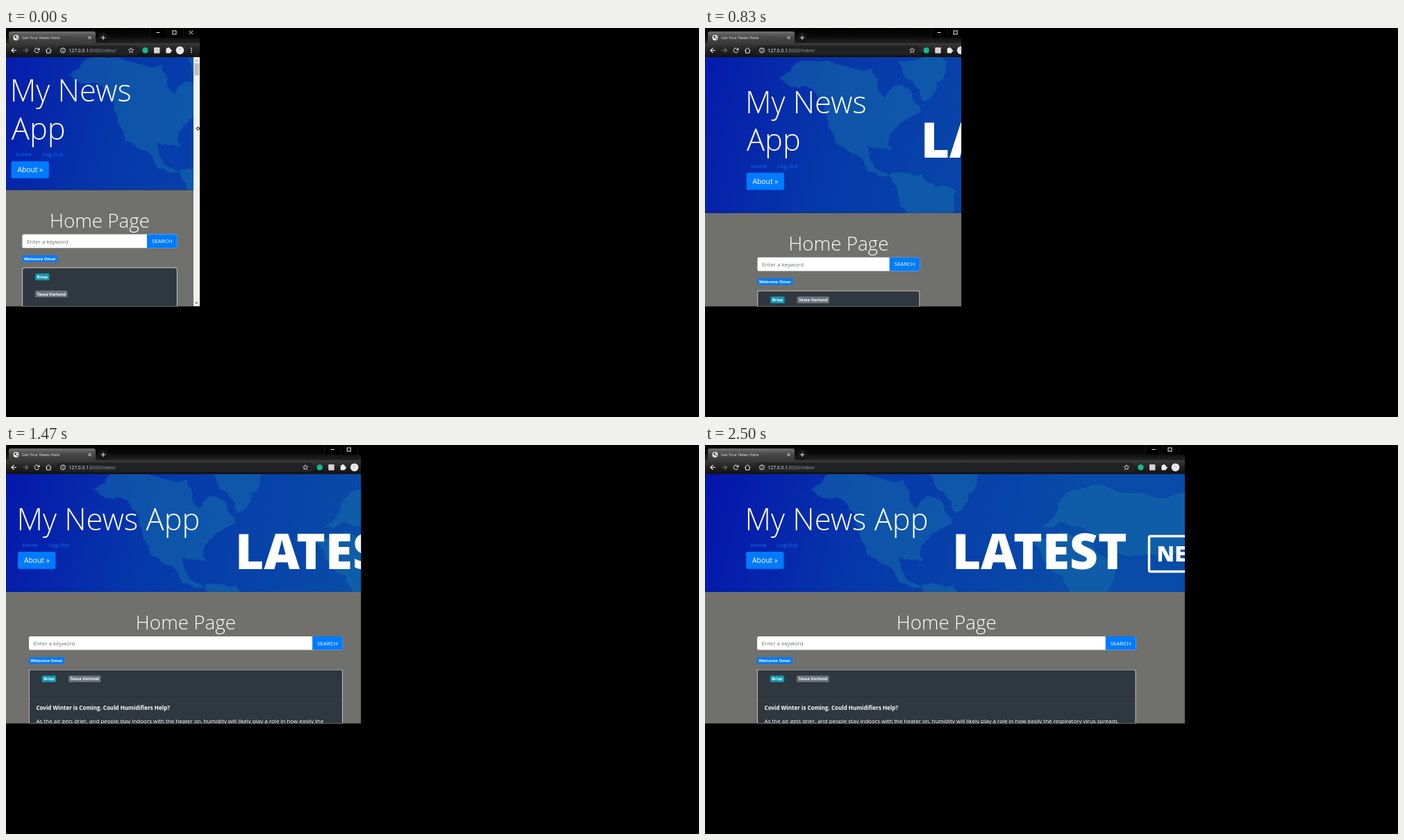
An HTML page with a canvas that plays this animation: 998 by 561 pixels, repeating every 2.53 s.

```html
<!DOCTYPE html>
<html lang="en">
<head>
<meta charset="utf-8">
<title>Responsive news page</title>
<style>
html, body { margin: 0; width: 100%; height: 100%; overflow: hidden; background: #000; }
canvas { display: block; width: 998px; height: 561px; }
</style>
</head>
<body>
<canvas id="stage" width="998" height="561"></canvas>
<script>
const ctx = document.getElementById('stage').getContext('2d');
const LOOP = 2530, BOTTOM = 401.5, PAGE_TOP = 42, REM = 8.31;
const BLUE = '#007bff', SANS = '"Open Sans", "Noto Sans", sans-serif';

// time, visible width, page width, browser frame width
const KEYS = [
  [0, 279, 270, 279], [30, 279, 270, 279], [530, 317.5, 309, 320],
  [630, 317, 339, 351], [1030, 419.5, 429, 442], [1100, 421, 438, 450],
  [1470, 512, 518.5, 531], [1600, 516, 545, 558], [1830, 571, 604, 619],
  [2070, 633, 663.5, 672], [2130, 673, 665, 674], [2400, 694.5, 692, 703],
  [2500, 691, 695.5, 706], [LOOP, 691, 695.5, 706]
];

// minimum window width, container width (page units)
const BREAKPOINTS = [[299, 540], [399, 720], [515, 960], [623, 1140]];

const northAmerica = coast([50, 22, 80, -2, 185, 8, 202, 50, 218, 32, 255, 70, 222, 92,
  208, 110, 212, 125, 178, 120, 184, 142, 214, 164, 154, 130, 122, 92, 116, 62, 90, 34], 1);
const southAmerica = coast([212, 158, 255, 160, 305, 185, 285, 235, 262, 235, 222, 190], 2);
const greenland = coast([222, -2, 292, -2, 258, 56], 3);
const africa = coast([372, 98, 452, 94, 486, 126, 436, 215, 414, 146], 4);
const eurasia = coast([382, 78, 416, 32, 470, 16, 700, 10, 690, 60, 610, 112, 566, 118, 490, 112, 440, 76], 5);
const LANDS = [northAmerica, southAmerica, greenland, africa, eurasia];

// roughens each side of a polygon by repeated midpoint displacement
function coast(points, seed) {
  const noise = () => {
    seed = (seed * 16807) % 2147483647;
    return seed / 2147483647 - 0.5;
  };
  noise(); noise();
  for (let pass = 0; pass < 3; pass++) {
    const finer = [];
    for (let i = 0; i < points.length; i += 2) {
      const x = points[i], y = points[i + 1];
      const dx = points[(i + 2) % points.length] - x, dy = points[(i + 3) % points.length] - y;
      const shift = noise() * 0.35;
      finer.push(x, y, x + dx / 2 - dy * shift, y + dy / 2 + dx * shift);
    }
    points = finer;
  }
  return points;
}

function rect(x, y, w, h, fill, radius = 0) {
  ctx.fillStyle = fill;
  ctx.beginPath();
  ctx.roundRect(x, y, w, h, radius);
  ctx.fill();
}

function circle(x, y, r, fill) {
  ctx.fillStyle = fill;
  ctx.beginPath();
  ctx.arc(x, y, r, 0, 7);
  ctx.fill();
}

function trace(points) {
  ctx.beginPath();
  for (let i = 0; i < points.length; i += 2) ctx.lineTo(points[i], points[i + 1]);
}

function line(points, color = '#eee', width = 1) {
  ctx.strokeStyle = color;
  ctx.lineWidth = width;
  trace(points);
  ctx.stroke();
}

function polygon(points, fill) {
  ctx.fillStyle = fill;
  trace(points);
  ctx.fill();
}

function ring(x, y, r, from = 0, to = 7) {
  ctx.strokeStyle = '#eee';
  ctx.lineWidth = 1;
  ctx.beginPath();
  ctx.arc(x, y, r, from, to);
  ctx.stroke();
}

function text(str, x, y, size, color = '#fff', weight = 400, align = 'left') {
  ctx.font = `${weight} ${size}px ${SANS}`;
  ctx.fillStyle = color;
  ctx.textAlign = align;
  ctx.fillText(str, x, y);
  return ctx.measureText(str).width;
}

function vertical(y0, y1, ...colors) {
  const g = ctx.createLinearGradient(0, y0, 0, y1);
  colors.forEach((c, i) => g.addColorStop(i / (colors.length - 1), c));
  return g;
}

function badge(str, x, y, fill) {
  ctx.font = `700 6px ${SANS}`;
  rect(x, y, ctx.measureText(str).width + 5, 9.6, fill, 1.5);
  text(str, x + 2.5, y + 7, 6, '#fff', 700);
}

function sizesAt(t) {
  const i = Math.max(1, KEYS.findIndex(k => k[0] > t));
  const a = KEYS[i - 1], b = KEYS[i], u = (t - a[0]) / (b[0] - a[0]);
  return [1, 2, 3].map(j => a[j] + (b[j] - a[j]) * u);
}

function drawTabs(frame) {
  rect(0, 0, frame, 22, vertical(0, 22, '#000', '#080808', '#242424'));
  rect(4, 5, 125, 17, vertical(5, 22, '#707070', '#484848', '#3a3a3a'), [3, 3, 0, 0]);
  circle(14.5, 14, 4, '#f2f2f2');
  polygon([12, 12, 15, 11, 15, 14, 13, 15], '#444');
  polygon([15, 15, 18, 14, 16, 17], '#444');
  text('Get Your News Here', 23, 16.2, 5.8, '#f0f0f0');
  line([118.5, 12, 122.5, 16]);
  line([122.5, 12, 118.5, 16]);
  circle(140, 14, 7.5, '#161616');
  line([136.8, 14, 143.2, 14]);
  line([140, 10.8, 140, 17.2]);

  rect(frame - 72, 0, 72, 14, '#000');
  for (const dx of [72, 48, 24]) rect(frame - dx, 0, 0.7, 14, '#222');
  line([frame - 62.5, 6.5, frame - 57.5, 6.5]);
  ctx.strokeRect(frame - 39, 4, 5, 5);
  line([frame - 15, 4, frame - 10, 9]);
  line([frame - 10, 4, frame - 15, 9]);
}

function drawArrow(x, dir, color) {
  line([x - 3.5 * dir, 32.2, x + 3.5 * dir, 32.2], color, 1.1);
  line([x, 28.8, x + 3.5 * dir, 32.2, x, 35.6], color, 1.1);
}

function drawStar(x, y) {
  const points = [];
  for (let i = 0; i <= 10; i++) {
    const r = i % 2 ? 1.7 : 3.9, a = i * Math.PI / 5 - Math.PI / 2;
    points.push(x + r * Math.cos(a), y + r * Math.sin(a));
  }
  line(points, '#ddd', 0.8);
}

function drawToolbar(frame) {
  rect(0, 22, frame, 20, vertical(22, 42, '#3b3b3b', '#222', '#111'));
  rect(73, 25.5, frame - 160, 13.5, '#202122', 6.7);
  drawArrow(11.5, -1, '#fff');
  drawArrow(28, 1, '#777');
  ring(44.5, 32.3, 3.2, 0.3, 5.4);
  polygon([48.4, 28.4, 48.4, 32, 44.8, 32], '#eee');
  line([57, 32.5, 61.3, 28.6, 65.6, 32.5]);
  line([58.5, 32, 58.5, 36, 64, 36, 64, 32]);
  ring(82, 32.2, 3.4);
  line([82, 31.7, 82, 34.2], '#ddd', 0.9);
  rect(81.5, 30, 1, 1, '#ddd');
  const host = text('127.0.0.1', 90.5, 34.7, 6.75, '#f5f5f5');
  text(':8000/index/', 90.5 + host, 34.7, 6.75, '#9aa0a6');

  drawStar(frame - 99, 32.4);
  circle(frame - 78.5, 32.2, 4.2, '#15b88f');
  rect(frame - 66, 28, 8.5, 8.5, '#d4d4d4', 1);
  rect(frame - 48.5, 29.3, 6.5, 7, '#eee', 0.8);
  circle(frame - 45.2, 29.2, 1.5, '#eee');
  circle(frame - 41.6, 32.8, 1.5, '#eee');
  circle(frame - 28.5, 32.2, 5.8, '#e9e9ee');
  circle(frame - 28.5, 30.8, 1.8, '#d2d2da');
  for (const y of [29.2, 32.2, 35.2]) circle(frame - 12, y, 0.85, '#eee');
}

function drawBanner(page, height) {
  ctx.save();
  ctx.beginPath();
  ctx.rect(0, PAGE_TOP, page, height);
  ctx.clip();
  ctx.translate(0.146 * page, PAGE_TOP + 0.15 * (height - 169.5));
  const sea = ctx.createLinearGradient(-100, 0, 420, 130);
  sea.addColorStop(0, '#0514ac');
  sea.addColorStop(0.45, '#0638aa');
  sea.addColorStop(1, '#084ba8');
  rect(-110, -20, 820, 270, sea);
  for (const land of LANDS) polygon(land, 'rgba(22,112,172,0.5)');
  text('LATEST', 254.5, 137, 71, '#fff', 800);
  ctx.strokeStyle = '#fff';
  ctx.lineWidth = 3.5;
  ctx.beginPath();
  ctx.roundRect(538, 89.5, 112, 51, 2);
  ctx.stroke();
  text('NEWS', 549, 126, 30.8, '#fff', 800);
  ctx.restore();
}

function drawCard(left, right, base, level) {
  const top = base + 112, stacked = level === 0;
  rect(left, top, right - left, 400, '#e9ecef', 2.5);
  rect(left + 0.7, top + 0.7, right - left - 1.4, 400, '#30383f', 2);
  rect(left + 0.7, top + (stacked ? 64 : 39.3), right - left - 1.4, 0.7, '#272e34');
  badge('Brisp', left + 18.7, top + 8.6, '#1299b3');
  badge('Tessa Varlund', left + (stacked ? 18.7 : 57), top + (stacked ? 33.3 : 8.6), '#6c757d');
  if (level < 2) return;
  text('Covid Winter is Coming. Could Humidifiers Help?', left + 10.5, base + 170.3, 8, '#fff', 700);
  const parts = ['As the air gets drier, and people stay indoors with the heater on, humidity will likely',
    ' play a role in how easily the', ' respiratory virus spreads.'];
  text(parts.slice(0, level - 1).join(''), left + 10.5, base + 189, 8);
}

function drawPage(page) {
  const level = BREAKPOINTS.filter(b => page + 9 >= b[0]).length;
  const container = level ? BREAKPOINTS[level - 1][1] * 0.5194 : page;
  const margin = (page - container) / 2;
  const x = margin + 7.8, left = margin + 23.4, right = page - left;
  const pad = level ? 4 * REM : 2 * REM;
  const lines = level < 2 ? ['My News', 'App'] : ['My News App'];
  const top = PAGE_TOP + pad, nav = top + lines.length * 54.8;
  const base = nav + 48.6 + pad;

  rect(0, base, page, 400, '#70706d');
  drawBanner(page, base - PAGE_TOP);
  lines.forEach((s, i) => text(s, x - (i ? 0 : 2), top + 47.3 + i * 54.8, 43.5, '#fff', 300));
  text('Home', x + 6.3, nav + 17, 8, '#0a74ff');
  text('Log Out', x + 44.5, nav + 17, 8, '#0a74ff');
  rect(x - 0.2, nav + 24, 54.2, 24.6, BLUE, 2.5);
  text('About »', x + 27, nav + 40, 10.3, '#fff', 400, 'center');

  text('Home Page', page / 2, base + 54.5, 27.8, '#fff', 300, 'center');
  rect(left, base + 64, right - left, 19.7, '#fff', 2);
  rect(right - 43.6, base + 64, 43.6, 19.7, BLUE, [0, 2, 2, 0]);
  text('Enter a keyword', left + 6.5, base + 77.2, 8, '#6c757d');
  text('SEARCH', right - 21.8, base + 76.8, 8, '#fff', 400, 'center');
  badge('Welcome Omar', left, base + 94.2, BLUE);
  drawCard(left, right, base, level);
}

function drawScrollbar(x) {
  rect(x, PAGE_TOP, 9, BOTTOM - PAGE_TOP, '#f1f1f1');
  rect(x + 0.8, 51, 7.4, 17.5, '#c1c1c1');
  polygon([x + 2.5, 48, x + 6.5, 48, x + 4.5, 45.8], '#a0a0a0');
  polygon([x + 2.5, 395.8, x + 6.5, 395.8, x + 4.5, 398], '#505050');
}

function drawCursor(x, y) {
  polygon([x - 3, y, x, y - 3, x + 3, y, x, y + 3], '#222');
  polygon([x - 1.6, y, x, y - 1.6, x + 1.6, y, x, y + 1.6], '#fff');
}

function render(now) {
  // the picture updates 30 times per second
  const step = Math.floor((now % LOOP + 3.34) * 0.03);
  const [visible, page, frame] = sizesAt(Math.min(step / 0.03, LOOP - 1));
  rect(0, 0, 998, 561, '#000');
  ctx.save();
  ctx.beginPath();
  ctx.rect(0, 0, visible, BOTTOM);
  ctx.clip();
  drawPage(page);
  drawScrollbar(page);
  drawTabs(frame);
  drawToolbar(frame);
  drawCursor(frame - 2.5, 145);
  ctx.restore();
}

const start = performance.now();
function tick() {
  render(performance.now() - start);
  requestAnimationFrame(tick);
}
tick();
</script>
</body>
</html>
```
